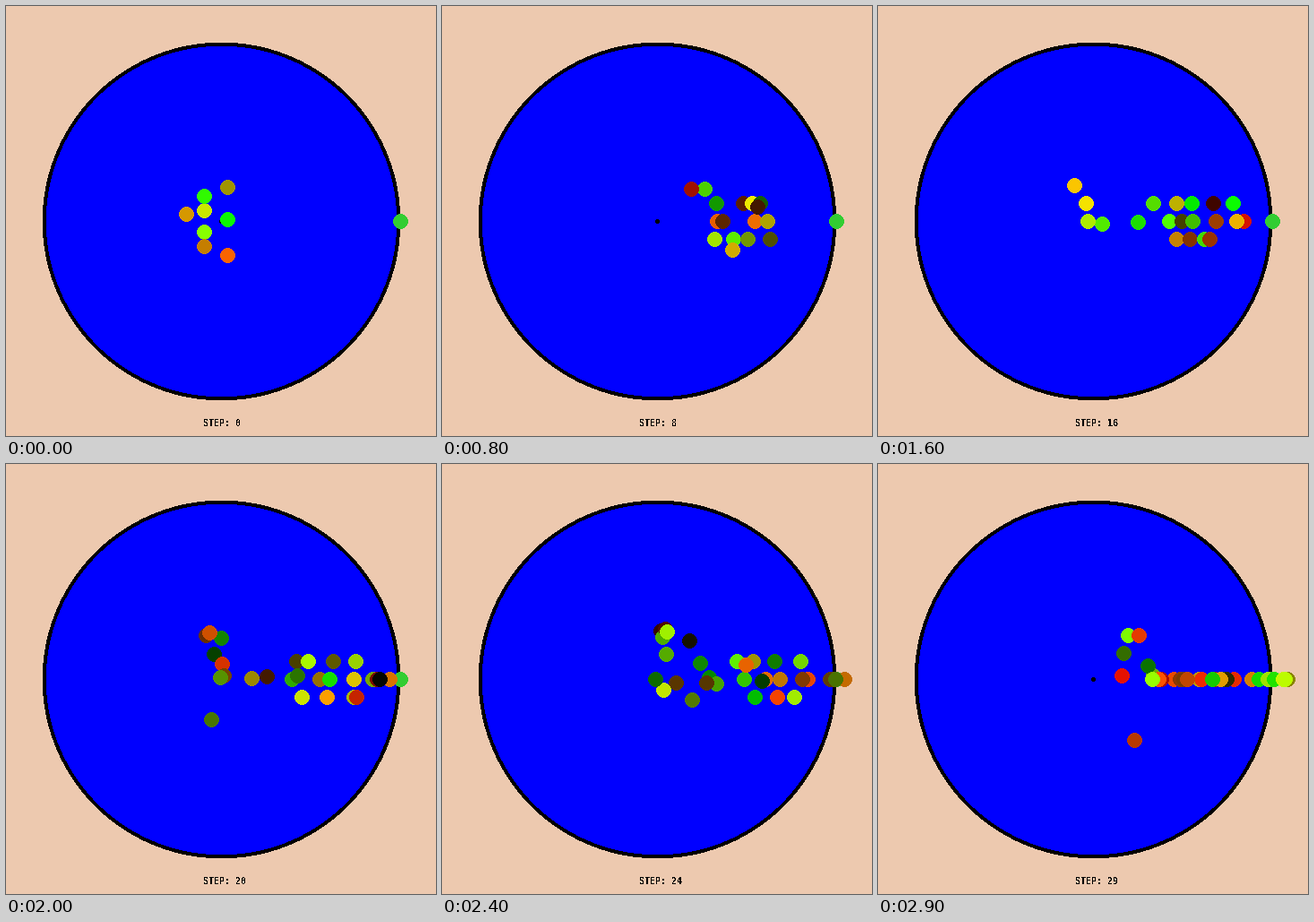
A matplotlib script for the animation above (3000 ms loop, 480 by 480 pixels).

```python
import numpy as np
import matplotlib.pyplot as plt
from matplotlib.animation import FuncAnimation
from matplotlib.collections import EllipseCollection
from matplotlib.patches import Circle

SIZE, STEPS = 480, 30
WAVE = 16           # ants per wave, two waves
EDGE = 0.7          # hard-edged discs fill every pixel they touch
ROW = 240
NEST = np.array([240, ROW])

# first ants, mirrored about the row through the nest
HUDDLE = [(-39, -8), (7, -2)] + [(x, s * y) for s in (-1, 1)
                                 for x, y in ((-19, 12.5), (-19, 27.5), (7, 38.5))]


def polar(angle, radius):
    a = np.radians(angle)
    return NEST + radius * np.array([np.cos(a), np.sin(a)])


def early_ant(k, rng):
    """Fan out from the nest, then file along one of three lanes."""
    if k < len(HUDDLE):
        birth, origin = 0, NEST + HUDDLE[k]
    else:
        birth, origin = 0.2 + 0.3 * (k - len(HUDDLE)), NEST
    scout = polar(-125 + 12.3 * (k * 7 % WAVE), rng.uniform(45, 105))
    join = 11 if k % 4 == 3 else 8
    x, lane = 300 + 5 * k, ROW + 20 * (k % 3 - 1)
    end = x + (STEPS - join) * (1.5 + 0.23 * k)
    return [birth, 4, join, STEPS], [origin, scout, (x, lane), (end, lane)]


def late_ant(k, rng):
    """Leave the nest one by one, search above it, then join the row."""
    birth = 12.5 + 0.75 * k
    angle = -125 + 4 * k
    if k % 3 == 0:
        scout = polar(0, rng.uniform(30, 65))
    else:
        scout = polar(-angle if k % 5 == 4 else angle, rng.uniform(50, 95))
    x = rng.uniform(300, 375)
    return ([birth, birth + 5, birth + 12, STEPS + 10],
            [NEST, scout, (x, ROW), (x + 40, ROW)])


seeded = np.random.default_rng(7)
ants = ([early_ant(k, seeded) for k in range(WAVE)]
        + [late_ant(k, seeded) for k in range(WAVE)])


def place(times, points, step, rng):
    xs, ys = np.transpose(points)
    x, y = np.interp(step, times, xs), np.interp(step, times, ys)
    if step >= times[2]:
        x = min(x, 450) + rng.uniform(-8, 8)
        # lanes close up near the goal and at the end
        if x > 400 or step > 26:
            y = ROW
    elif step > 0:
        x, y = x + rng.uniform(-5, 5), y + rng.uniform(-5, 5)
    return round(x), round(y)


def ants_at(step):
    rng = np.random.default_rng(100 + step)
    spots = [place(t, p, step, rng) for t, p in ants if step >= t[0]]
    colors = rng.random((len(spots), 3)) * [1, 1, 0]
    return np.array(spots), colors


fig = plt.figure(figsize=(4.8, 4.8), dpi=100, facecolor="#edc9af")
ax = fig.add_axes([0, 0, 1, 1])
ax.set(xlim=(0, SIZE), ylim=(SIZE, 0))
ax.axis("off")


def disc(x, y, r, color, z):
    ax.add_patch(Circle((x + 0.5, y + 0.5), r - EDGE, fc=color, ec="none", lw=0,
                        aa=False, zorder=z))


disc(*NEST, 200, "black", 1)
disc(*NEST, 196, "#0000ff", 2)
disc(*NEST, 2.6, "black", 3)
disc(440, ROW, 8.4, "#32cd32", 4)

width = 2 * (8.4 - EDGE)
swarm = EllipseCollection([width], [width], [0], units="x", offsets=[NEST],
                          offset_transform=ax.transData, edgecolors="none",
                          linewidths=0, antialiaseds=False, zorder=5)
ax.add_collection(swarm, autolim=False)

label = ax.text(220, 469, "", ha="left", va="baseline", family="DejaVu Sans Mono",
                weight="bold", size=7.2, antialiased=False, zorder=6)


def draw(step):
    spots, colors = ants_at(step)
    swarm.set_offsets(spots + 0.5)
    swarm.set_facecolor(colors)
    label.set_text(f"STEP: {step}")
    return swarm, label


anim = FuncAnimation(fig, draw, frames=STEPS, interval=100, repeat=True,
                     repeat_delay=0, blit=False)
plt.show()
```
